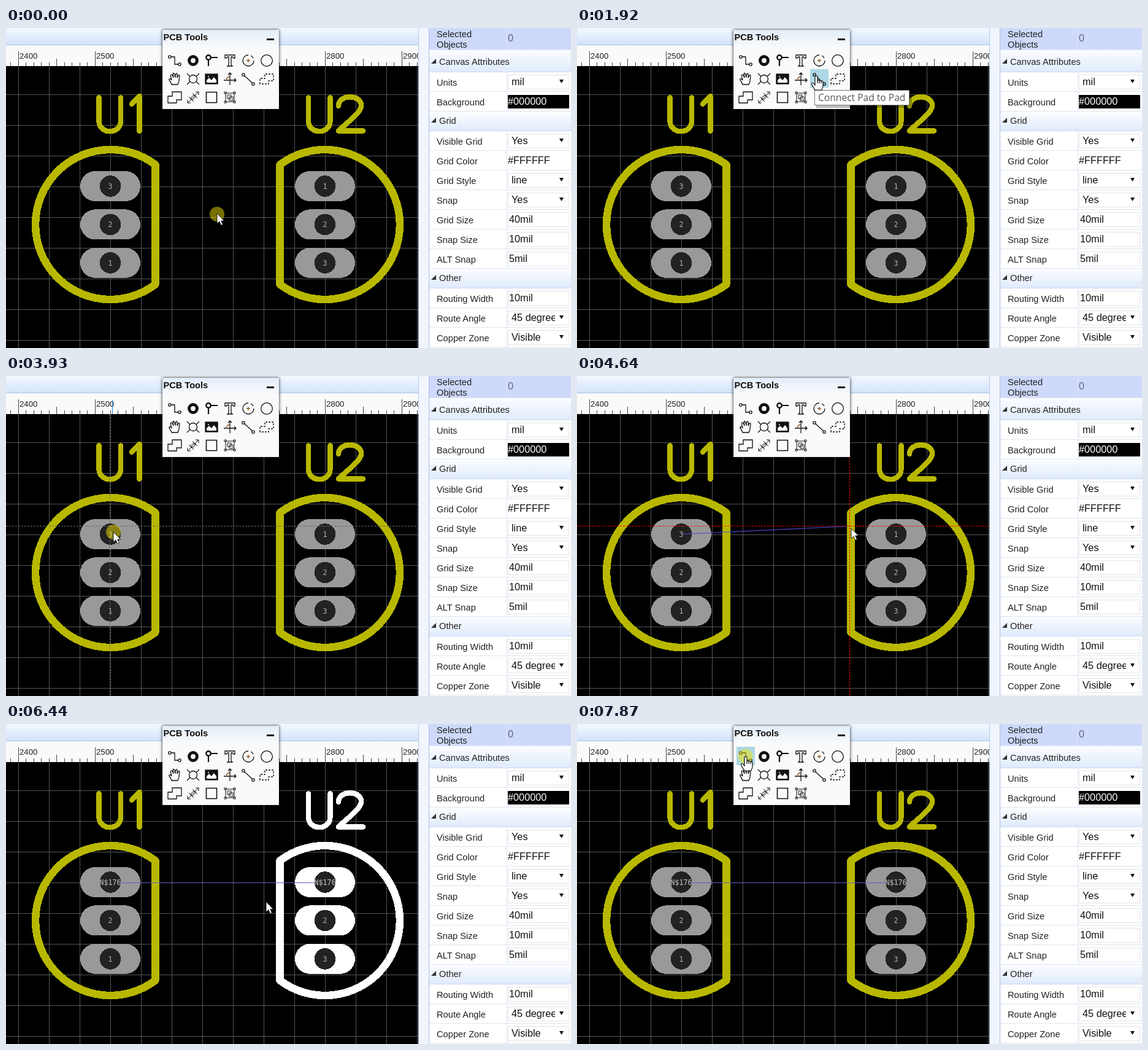
These frames come from a looping animation (921 by 521 pixels, 8000 ms). An HTML page:

```html
<!DOCTYPE html>
<html lang="en">
<head>
<meta charset="utf-8">
<title>PCB editor</title>
<style>
html, body { margin: 0; width: 100%; height: 100%; overflow: hidden; background: #fff; }
svg { display: block; width: 921px; height: 521px; font-family: "Liberation Sans", Arial, sans-serif; }
.crisp { shape-rendering: crispEdges; }
.label { font-size: 14.67px; fill: #222; }
.value { font-size: 16.3px; fill: #111; }
.pin { font: 11.6px "DejaVu Sans Mono", monospace; fill: #b0b0b0; text-anchor: middle; }
.net { stroke: #444; stroke-width: .8px; paint-order: stroke; }
.icon { fill: none; stroke: #111; stroke-width: 1.3px; }
.part { fill: none; stroke: currentColor; stroke-width: 12.5px; stroke-linejoin: round; }
.name { fill: none; stroke: currentColor; stroke-width: 8.5px; stroke-linecap: round; stroke-linejoin: round; }
</style>
</head>
<body>
<svg id="stage" viewBox="0 0 921 521" xmlns="http://www.w3.org/2000/svg"></svg>
<script>
const LOOP = 8000, PITCH = 12.5;
const rect = (x, y, w, h, fill, more = '') =>
  `<rect x="${x}" y="${y}" width="${w}" height="${h}" fill="${fill}" ${more}/>`;
const text = (x, y, s, cls, more = '') => `<text x="${x}" y="${y}" class="${cls}" ${more}>${s}</text>`;
const path = (d, more = '') => `<path d="${d}" ${more}/>`;
const circle = (x, y, r, more = '') => `<circle cx="${x}" cy="${y}" r="${r}" ${more}/>`;
const gradient = (id, from, to) =>
  `<linearGradient id="${id}" x2="0" y2="1"><stop stop-color="${from}"/><stop offset="1" stop-color="${to}"/></linearGradient>`;

function ruler() {
  let ticks = '', labels = '';
  for (let i = -1; i <= 52; i++) {
    const x = Math.floor(20 + i * PITCH);
    const top = i % 10 === 0 ? 38 : i % 5 === 0 ? 50 : 56;
    ticks += `M${x + .5} ${top}V62`;
    if (i >= 0 && i % 10 === 0) labels += text(x + 2, 50, 2400 + i * 10, '', 'font-size="13.2" fill="#222"');
  }
  return rect(0, 0, 673, 28, 'url(#bar)') + rect(0, 27, 673, 1, '#a5c2ea') +
    rect(0, 28, 673, 34, '#fafafa') +
    path(ticks, 'class="crisp" stroke="#444" fill="none"') + labels;
}

function grid() {
  let d = '';
  for (let x = 20.5; x < 673; x += 50) d += `M${x} 62V521`;
  for (let y = 108.5; y < 521; y += 50) d += `M0 ${y}H673`;
  return rect(0, 62, 673, 459, '#000') + path(d, 'class="crisp" stroke="#555" fill="none"');
}

const PAD_Y = [257.5, 319.9, 382.4];
function part(id, cx, side, name) {
  const edge = cx + side * 73.5;
  const pads = PAD_Y.map(y => rect(cx - 49, y - 24.5, 98, 49, 'currentColor', 'rx="24.5"')).join('');
  return `<g id="${id}" class="crisp" color="#b8b800">` + path(name, 'class="name"') +
    path(`M${edge} 222.6A122 122 0 1 ${side > 0 ? 0 : 1} ${edge} 417.4Z`, 'class="part"') +
    `</g><g id="${id}pads" class="crisp" color="#999">${pads}</g>`;
}
function holes(cx, names, id) {
  return PAD_Y.map((y, i) => circle(cx, y, 17.3, 'class="crisp" fill="#222"') +
    text(cx, y + 4.3, names[i], 'pin', i ? '' : `id="${id}"`)).join('');
}

function icons() {
  const hand = 'M-5 9C-6 5-10 2-9 0c1-1 3 0 4 2C-5 0-8-6-6-7c2-1 3 3 4 5C-2-4-4-9-2-9.500c2 0 2 4 3 7C1-5 1-9 3-9c2 0 1 5 1 7C5-4 6-7 7.500-6.500 9-6 7 0 7 3 7 6 5 7 5 9Z';
  const dot = (x, y) => circle(x, y, 2.2);
  const list = [
    dot(-8, -6) + dot(8, 6) + path('M-6-6H0V6H6'),
    circle(0, 0, 6.4, 'style="stroke-width:5px"'),
    circle(-5, -5, 3.7, 'style="stroke-width:2.4px"') + path('M-1-5H10M-5-1V9', 'style="stroke-width:2.2px"'),
    path('M-8-9H8V-4H6L4-6H2V7L4 9H-4L-2 7V-6H-4L-6-4H-8Z'),
    path('M0-9A9 9 0 1 0 9 0M4-8A9 9 0 0 1 8-4') + path('M-3 0H3M0-3V3', 'stroke="#8a5a20"'),
    circle(0, 0, 9.3),
    path(hand),
    circle(0, 0, 6.5) + path('M-10-9L-5-4M10-9L5-4M-10 9L-5 4M10 9L5 4'),
    rect(-10, -8, 20, 16, '#111') + path('M-8 6V2L-4-2 0 2 4-3 8 2V6Z', 'fill="#fff" stroke="none"') + circle(-5, -4, 1.6, 'fill="#fff"'),
    path('M0 10V-10M-3-7L0-10 3-7M-10 2H10M7-1L10 2 7 5') + path('M-6 2A6 6 0 0 1 0-4', 'stroke="#8a5a20"'),
    dot(-8, -7) + dot(8, 8) + path('M-6-5L6 6'),
    path('M-11 8V-1H-3V-8H11V3H3V8Z', 'stroke-dasharray="3 2"'),
    path('M-11 9V-2H-4V-9H11V4H3V9Z'),
    path('M-9 9L9-9M-9 4V9H-4M4-9H9V-4M-7-1L1 7M-1-7L7 1M-4 1L1-4 4-1-1 4Z', 'style="stroke-width:1px"'),
    path('M-8.500-8.500H8.500V8.500H-8.500Z', 'style="stroke-width:1.600px"'),
    path('M-7-7H7V7H-7ZM-4-4H2V2H-4ZM-1-1H5V5H-1Z', 'style="stroke-width:1px"') +
      path('M-9-9h3v3h-3zM6-9h3v3h-3zM-9 6h3v3h-3zM6 6h3v3h-3z', 'style="stroke-width:1px"'),
  ];
  return list.map((g, i) =>
    `<g class="icon" transform="translate(${275 + i % 6 * 30} ${53 + Math.floor(i / 6) * 30})">${g}</g>`).join('');
}

function tools() {
  return `<g style="filter:drop-shadow(0 0 2.5px rgba(0,0,0,.85))">${rect(255, 3, 190, 129, '#dfe9f8')}</g>` +
    rect(256, 4, 188, 28, 'url(#head)') + rect(256, 32, 188, 99, '#fafafa') +
    text(256.5, 20, 'PCB Tools', '', 'font-size="14.6" font-weight="bold" fill="#111"') +
    rect(425, 17, 12, 3, '#111') + rect(0, 0, 30, 30, '#add8e6', 'id="hover"') + icons();
}

function properties() {
  const rows = [
    ['Canvas Attributes'], ['Units', 'mil', 's'], ['Background', '#000000', 'b'],
    ['Grid'], ['Visible Grid', 'Yes', 's'], ['Grid Color', '#FFFFFF', 'c'], ['Grid Style', 'line', 's'],
    ['Snap', 'Yes', 's'], ['Grid Size', '40mil', 'i'], ['Snap Size', '10mil', 'i'], ['ALT Snap', '5mil', 'i'],
    ['Other'], ['Routing Width', '10mil', 'i'], ['Route Angle', '45 degrees', 's'], ['Copper Zone', 'Visible', 's'],
  ];
  let out = rect(673, 0, 17, 521, '#f1f5fd') + rect(672, 0, 1, 521, '#b4cbee') + rect(689, 0, 232, 521, '#a9c0e6') +
    rect(690, 0, 231, 521, '#fff') + rect(690, 0, 231, 35, '#ced9fb') +
    text(702, 15, 'Selected', 'label') + text(702, 32, 'Objects', 'label') +
    text(818, 22, '0', 'value', 'style="fill:#5d6680"') + rect(816, 0, 1, 521, '#dde5f3') + rect(690, 35, 231, 1, '#dde5f3');
  rows.forEach(([name, value, kind], i) => {
    const y = 40 + i * 32;
    if (!kind) {
      const top = i ? y : 36;
      out += rect(690, top, 231, y + 32 - top, 'url(#group)') + rect(690, y + 31, 231, 1, '#c9d9f1') +
        path(`M693 ${y + 18}h8v-8z`, 'fill="#333"') + text(706, y + 20, name, 'label');
      return;
    }
    out += rect(690, y + 31, 231, 1, '#dde5f3') + text(702, y + 22, name, 'label');
    if (kind === 'b') out += rect(818, y + 5, 100, 22, '#000');
    if (kind === 's' || kind === 'i')
      out += rect(818.5, y + 4.5, 99, 23, '#fff', 'stroke="#e4e4e4"');
    const x = { s: 824, i: 820, b: 818, c: 818 }[kind];
    out += text(x, y + 21, value, 'value', kind === 'b' ? 'style="fill:#fff"' : '');
    if (kind === 's')
      out += rect(895, y + 5, 22, 22, '#fff') + path(`M902 ${y + 12}h7l-3.500 6z`, 'fill="#111"');
  });
  return out;
}

const stage = document.getElementById('stage');
stage.innerHTML = `<defs>${gradient('bar', '#f3f8ff', '#d2e3fa')}${gradient('head', '#e3effb', '#fafafa')}${gradient('group', '#fbfdff', '#dfeafb')}</defs>` +
  grid() +
  part('u1', 170, 1, 'M151.500 113.500V151C151.500 174 187 174 187 151V113.500M205 124L217.500 111V167.500') +
  part('u2', 520, -1, 'M493 113.500V151C493 174 528.500 174 528.500 151V113.500M542 127C542 107.500 579 107.500 579 126C579 138 560 150 542 167.500H582') +
  path('M187 258.500H503', 'id="rat" class="crisp" stroke="#5f5fd0"') +
  holes(170, [3, 2, 1], 'net1') + holes(520, [1, 2, 3], 'net2') +
  path('', 'id="wire" stroke="#4a4ad4" stroke-width="1.2"') +
  path('', 'id="hline" class="crisp" stroke-dasharray="3 2"') +
  path('', 'id="vline" class="crisp" stroke-dasharray="3 2"') +
  ruler() + rect(0, 39, 1, 23, '#1e83e8', 'id="mark"') + tools() + properties() +
  `<g id="tip">${rect(390, 104, 156, 26, '#000', 'opacity=".25"')}${rect(387.5, 101.5, 154, 24, '#fff', 'stroke="#767676"')}` +
  text(393, 119, 'Connect Pad to Pad', '', 'style="font:15.6px \'Open Sans\',\'Noto Sans\',sans-serif" fill="#575757"') + '</g>' +
  circle(0, 0, 12, 'id="click" fill="#f0e000" opacity=".5"') +
  path('M0 0V16.500L3.800 13 6.700 19.300 9.400 18 6.700 12H11.800Z', 'id="arrow" fill="#fff" stroke="#111" stroke-width=".9"') +
  `<g id="hand" fill="#fff" stroke="#111" stroke-width="1.2">` +
  path('M-2 1.500C-2-.7 2-.7 2 1.500V8c0-1.600 3-1.400 3 .4c0-1.400 3-1.200 3 .6c0-1.200 3-1 3 1V16c0 4-2 4-2 7H-2.500c0-3-5-6-5-10c0-2 3-2 3.500 0l2 2z') +
  path('M2 8V12M5 8.500V12M8 9V12', 'fill="none"') + '</g>';

const el = {};
for (const node of stage.querySelectorAll('[id]')) el[node.id] = node;
const show = (node, on) => { node.style.display = on ? '' : 'none'; };
const place = (node, x, y) => node.setAttribute('transform', `translate(${x} ${y})`);
const within = (t, a, b) => t >= a && t < b;

// Progress in equal jumps, the first at a and the last at b.
function steps(t, a, b, n) {
  return Math.min(n, Math.floor((t - a) * (n - 1) / (b - a) + .1) + 1) / n;
}
// Parabola through three values at 0, m and 1.
function through(p, m, v0, vm, v1) {
  const b = ((v1 - v0) - (vm - v0) / m) / (1 - m);
  return v0 + (v1 - v0 - b) * p + b * p * p;
}

// start, end, jumps, from, time share of the middle point, middle, to
const moves = [
  [610, 1390, 11, [344, 302], .5, [367, 190], [390, 78]],
  [2780, 3470, 10, [390, 78], .6, [265, 239.5], [174, 254]],
  [3630, 3780, 2, [174, 254], .5, [174.5, 254], [175, 254]],
  [4100, 4880, 11, [175, 254], 8 / 11, [447, 248], [500, 259]],
  [4970, 5290, 5, [500, 259], .5, [515, 259.5], [526, 259.5]],
  [6210, 6680, 7, [526, 259.5], 4 / 7, [424, 289.5], [323, 319]],
  [6850, 7640, 11, [323, 319], .55, [180, 130], [274, 52]],
  [7710, 7711, 1, [274, 52], .5, [274.5, 52.5], [275, 53]],
];
function pointer(t) {
  let pos = moves[0][3];
  for (const [a, b, n, from, m, mid, to] of moves) {
    if (t < a) break;
    let p = steps(t, a, b, n);
    if (a === 610) p = p * p * (3 - 2 * p);
    pos = [0, 1].map(i => through(p, m, from[i], mid[i], to[i]));
  }
  return pos;
}

const clicks = [[0, 610, 344, 303], [3930, 4100, 175, 254], [5690, 6210, 526, 259.5], [7870, 8000, 274.5, 52.5]];
const snap = (v, origin) => origin + Math.round((v - origin) / PITCH) * PITCH;

function draw(t) {
  const [x, y] = pointer(t);
  const col = Math.floor((x - 260) / 30), row = Math.floor((y - 38) / 30);
  const over = col >= 0 && row >= 0 && row < 3 && col < (row === 2 ? 4 : 6);
  show(el.hover, over);
  place(el.hover, 260 + col * 30, 37 + row * 30);
  show(el.hand, over);
  show(el.arrow, !over);
  place(over ? el.hand : el.arrow, x, y);
  place(el.mark, Math.floor(x - 2), 0);

  const click = clicks.find(([a, b]) => within(t, a, b));
  show(el.click, click);
  if (click) place(el.click, click[2], click[3]);

  const cx = snap(x - 1, 169.5), cy = snap(y - 4, 256.5);
  const cross = within(t, 2780, 6210), wiring = within(t, 4100, 5830);
  show(el.hline, cross);
  show(el.vline, cross);
  el.hline.setAttribute('d', `M0 ${Math.floor(cy) + .5}H673`);
  el.vline.setAttribute('d', `M${Math.floor(cx) + .5} 62V521`);
  el.hline.setAttribute('stroke', within(t, 4100, 4880) ? '#f00' : '#6a6a6a');
  el.vline.setAttribute('stroke', t >= 4100 ? '#f00' : '#6a6a6a');
  show(el.wire, wiring);
  el.wire.setAttribute('d', `M172 257.500L${cx} ${cy + .5}`);

  const joined = t >= 5830;
  show(el.rat, joined);
  [[el.net1, 3], [el.net2, 1]].forEach(([node, pin]) => {
    node.textContent = joined ? 'N$176' : pin;
    node.classList.toggle('net', joined);
  });
  const lit = within(t, 6210, 6530);
  el.u2.setAttribute('color', lit ? '#fff' : '#b8b800');
  el.u2pads.setAttribute('color', lit ? '#fff' : '#999');

  show(el.tip, within(t, 1770, 2780));
  el.tip.setAttribute('opacity', steps(Math.max(t, 1770), 1770, 1920, 3));
}

const start = performance.now();
function tick() {
  draw((performance.now() - start) % LOOP);
  requestAnimationFrame(tick);
}
tick();
</script>
</body>
</html>
```
